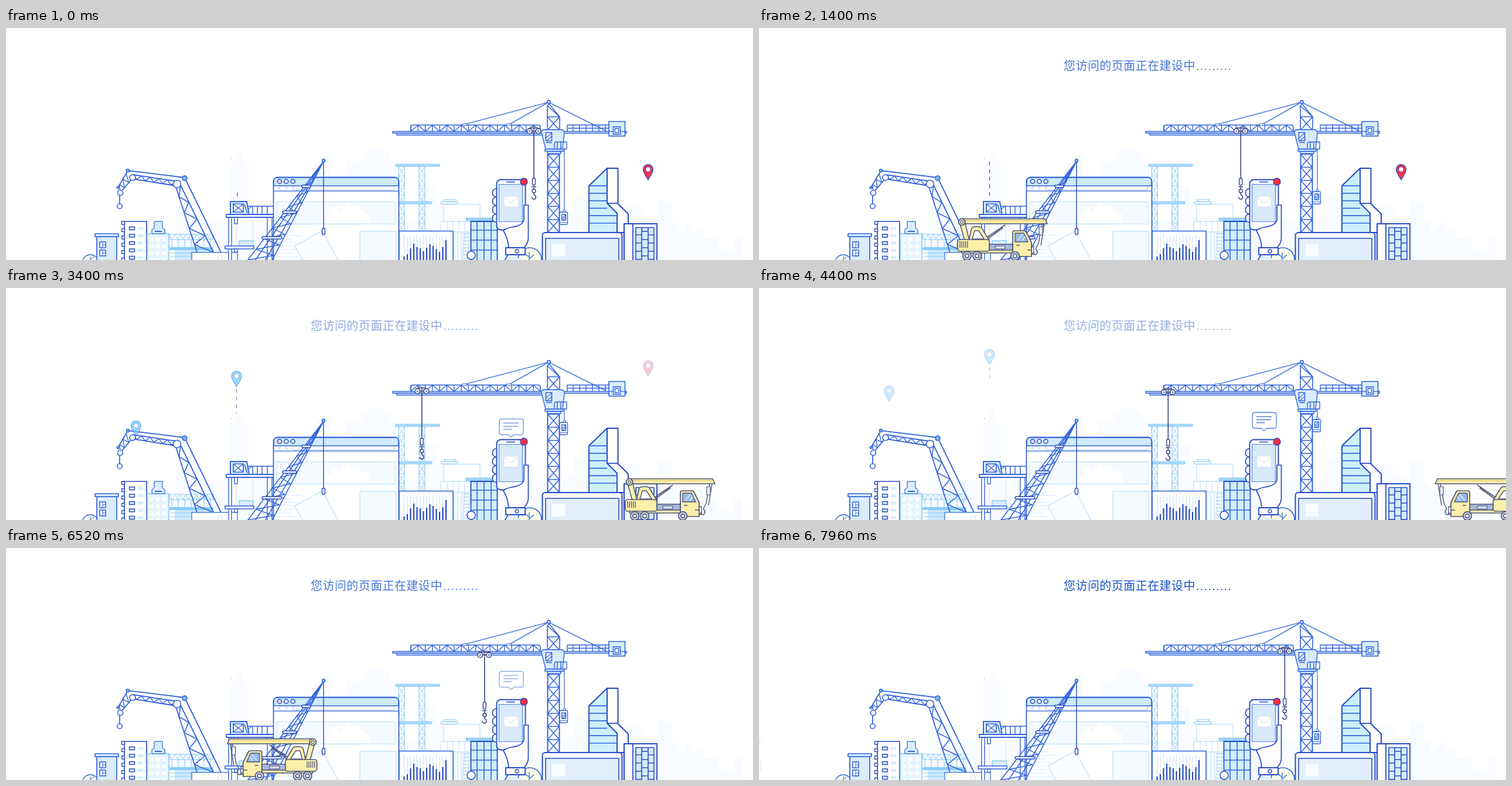
Animation, 1275 px wide and 397 px high, one loop 8000 ms. Source, as an HTML page:

```html
<!DOCTYPE html>
<html lang="zh-CN">
<head>
<meta charset="utf-8">
<style>
html, body { margin: 0; width: 100%; height: 100%; overflow: hidden; background: #fff; }
svg { display: block; width: 1275px; height: 397px; }
</style>
</head>
<body>
<svg id="stage" viewBox="0 0 1275 397" fill="none" stroke-linejoin="round"></svg>
<script>
const NAVY = '#2449c2', BLUE = '#3263d8', MID = '#4f80e2', SKY = '#8ccbf8', PALE = '#c4e5fb';
const ICE = '#d9edfd', MIST = '#f5faff', INK = '#4c5378', IRON = '#38447f', YELLOW = '#fcefa9';

// Shape helpers, all returning SVG markup
const paint = (s, w, f) => `stroke="${s}" stroke-width="${w}" fill="${f}"`;
const path = (d, s = BLUE, w = 1.6, f = 'none') => `<path d="${d}" ${paint(s, w, f)}/>`;
const line = (p, s, w, f) => path('M' + p, s, w, f);
const rect = (x, y, w, h, s = BLUE, sw = 1.6, f = 'none', r = 0) =>
  `<rect x="${x}" y="${y}" width="${w}" height="${h}" rx="${r}" ${paint(s, sw, f)}/>`;
const disc = (x, y, r, s = BLUE, w = 1.6, f = '#fff') => `<circle cx="${x}" cy="${y}" r="${r}" ${paint(s, w, f)}/>`;
const group = (id, body) => `<g id="${id}">${body}</g>`;
const times = (n, fn) => Array.from({ length: n }, (_, i) => fn(i)).join('');
const mix = (a, b, k) => a + (b - a) * k;

// Zigzag bracing between rail a and rail b, each [x1, y1, x2, y2]
function zig(a, b, n, s, w = 1.3) {
  let d = '';
  for (let i = 0; i <= n; i++) {
    const r = i % 2 ? b : a;
    d += `${mix(r[0], r[2], i / n).toFixed(1)} ${mix(r[1], r[3], i / n).toFixed(1)} `;
  }
  return line(d, s, w);
}
function mast(x1, x2, top, bottom, n, s, w) {
  const h = (bottom - top) / n;
  return path(`M${x1} ${top}V${bottom}M${x2} ${top}V${bottom}`, s, w) + times(n, i => {
    const y = top + i * h;
    return path(`M${x1} ${y}H${x2}L${x1} ${y + h}M${x1} ${y}L${x2} ${y + h}`, s, w * .75);
  });
}

const skyline = line('290 397V300H318V328H383V232L390 228L398 205L406 228L413 236V328H520V240L531 230L545 217H553V250H580V228H609V214H618V205H645V214H655V228H665V330H706V270H735V300H760V330H960V320H970V290H990V330H1055V305H1065V300H1080L1085 318L1100 325H1112V297H1136V332H1145V346H1160V332H1171V346H1190V360H1215V378H1229V384H1243V360H1256V397Z', 'none', 0, '#f8fbff')
  + rect(384, 223, 1.5, 1, 'none', 0, '#999');

function leftTown() {
  return disc(144, 402, 14, BLUE, 1.4, '#fbfdec') + path('M144 397V391M144 396L150 392', BLUE, 1)
    + rect(155, 357, 34, 44, BLUE, 1.7, ICE) + rect(152, 352, 40, 5, BLUE, 1.7, ICE)
    + times(2, i => rect(160, 366 + 14 * i, 10, 10, BLUE, 1.5, '#fff') + path(`M165 ${366 + 14 * i}v10M165 ${371 + 14 * i}h5`, BLUE, 1))
    + rect(202, 331, 38, 70, NAVY, 1.7, '#fff')
    + times(6, i => rect(197.5, 331 + 12.5 * i, 5, 5, NAVY, 1.4, '#fff'))
    + times(5, i => rect(210.5, 340.5 + 12.5 * i, 9, 5, NAVY, 1.4, ICE) + rect(225, 340.5 + 12.5 * i, 9, 5, 'none', 0, ICE))
    + rect(241, 352, 37, 49, SKY, 1.6, '#e6f4fe')
    + times(12, i => rect(245 + 11 * (i % 3), 358 + 12 * (i / 3 | 0), 6, 7, 'none', 0, '#fff'))
    + path('M249 352V345L253 342V331H267V342L271 345V352Z', MID, 1.5, ICE) + path('M254 348h12', BLUE, 2)
    + rect(279, 353, 74, 9, SKY, 1.2) + zig([279, 353, 353, 353], [279, 362, 353, 362], 16, SKY, 1)
    + times(7, i => path(`M${283 + 11 * i} 362v14`, SKY, 1.2))
    + rect(279, 375, 75, 5, 'none', 0, SKY) + rect(288, 380, 66, 20, 'none', 0, '#cce7fc')
    + path('M280 385h72M280 391h72', SKY, 1.2);
}

function leftCrane() {
  return path('M208 244L305 256L367 384M217 251L290 262M215 258L290 270M290 272L326 384M297 267L354 384M208 244L191 273M216 257L195 282M194 286V301', BLUE, 1.8)
    + zig([217, 251, 290, 262], [215, 258, 290, 270], 10, BLUE, 1.4)
    + zig([298, 270, 354, 384], [291, 275, 326, 384], 8, BLUE, 1.6)
    + zig([205, 249, 191, 273], [213, 260, 195, 282], 5, BLUE, 1.4)
    + disc(208, 244, 2.5, BLUE, 1.6, SKY) + disc(191, 273, 1.8, BLUE, 1.5, SKY) + disc(305, 257, 4, BLUE, 1.6, '#7fb2ef')
    + disc(292, 267, 6.5) + disc(216, 256, 5) + disc(195, 282, 4.5) + disc(194, 305, 4.2)
    + rect(317, 384, 78, 20, MID, 1.5, '#fff') + rect(362, 390, 7, 12, '#ccd8ee', 1);
}

function tower() {
  return rect(380, 324, 5, 76, BLUE, 1.4, '#fff') + rect(446, 324, 8, 76, BLUE, 1.4, '#fff')
    + path('M383 319V297H411L415 319', BLUE, 1.9, ICE) + rect(388, 301, 17, 14, BLUE, 1.7, '#fff')
    + path('M388 301L405 315M405 301L388 315M407 302L412 317', BLUE, 1.5)
    + path('M413 305H456M413 310L420 305M421 305V319M429 305V319M437 305V319M446 305V319', BLUE, 1.5)
    + rect(376, 319, 81, 5, BLUE, 1.8, '#fff') + rect(390, 324, 5, 11, BLUE, 1.4, '#fff')
    + path('M393 335V373M421 324V373', '#d5e6fb', 1) + rect(398, 364, 24, 9, SKY, 1.4, ICE)
    + rect(374, 373, 49, 5, BLUE, 1.6, '#fff') + rect(390, 378, 5, 6, BLUE, 1.3, '#fff');
}

function browser() {
  return rect(456.5, 255.5, 214, 160, BLUE, 1.8, '#fff', 7)
    + path('M457 270V262Q457 256 464 256H664Q670 256 670 262V270Z', BLUE, 1.6, '#cfeafd')
    + path('M457 279H670', MID, 1.4)
    + ['#ffdbe3', '#e2f0ff', '#e2f0ff'].map((f, i) => disc(467 + 11.3 * i, 262.5, 3.6, NAVY, 1.5, f)).join('')
    + path('M469 271L465 274L469 277M476 271L480 274L476 277', '#a9bfe8', 1)
    + rect(489, 271, 175, 6, '#a9bfe8', 1, '#fff', 3)
    + rect(461.5, 297.5, 203, 38, '#c9e8fc', 1.3, MIST)
    + path('M545 334V319H555V306H565V313H572V304H580V300H586V306H596V303H603V313H612V318H621V334Z', 'none', 0, '#fff')
    + times(8, i => path(`M461 ${349 + 6 * i}h${[32, 44, 28, 38][i % 4]}`, '#e0effc', 1.4))
    + path('M508 400L493 373L540 347L568 400', PALE, 1.5, '#fafdff')
    + rect(604, 348, 61, 60, PALE, 1.5, MIST);
}

function lattice() {
  const bar = (x, y, w) => rect(x, y, w, 4, NAVY, 1.5, '#fff', 2);
  return path('M542 228L412 398M541 230L453 400M541 230L425 398M540 232L442 398', BLUE, 1.6)
    + zig([538, 233, 413, 397], [538, 236, 452, 398], 18, BLUE, 1.4)
    + bar(505, 269, 15) + bar(472, 313, 24) + bar(437, 357, 34)
    + path('M542 230V343', NAVY, 1.4) + rect(539.5, 342.5, 5, 11, NAVY, 1.4, '#fff', 2.5)
    + disc(542, 227, 2.6, BLUE, 1.5, SKY);
}

function middle() {
  const tops = [391, 387, 377, 369, 375, 377, 382, 376, 370, 373, 378, 383, 375, 363];
  return mast(670, 680, 237, 350, 7, SKY, 1.2) + mast(705, 715, 237, 350, 7, SKY, 1.2)
    + rect(665, 233, 75, 4, SKY, 1, '#a9dafa') + rect(671, 297, 56, 4, SKY, 1, '#a9dafa')
    + rect(747, 301.5, 62, 30, PALE, 1.4, '#fff') + rect(743, 297, 28, 4, SKY, 1.2, '#fff') + rect(748, 293.5, 20, 3, SKY, 1.2, '#fff')
    + rect(742, 331, 74, 18, PALE, 1.4, '#fff') + times(6, i => path(`M${753 + 10 * i} 331v18`, PALE, 1.2))
    + path('M765 349V397M771 349V397M777 349V397M783 349L779 397M792 349L788 397', PALE, 1.2)
    + times(8, i => path(`M780 ${352 + 6 * i}h11`, SKY, 1))
    + rect(671, 347.5, 92, 60, BLUE, 1.6, '#fff')
    + tops.map((y, i) => {
      const x = 679.5 + 5.5 * i;
      return path(`M${x} ${354 + 3 * (i % 2)}V397`, '#d9e8f6', 1.6) + path(`M${x} ${y}V397`, NAVY, 2.2);
    }).join('')
    + rect(785, 325, 50, 5, SKY, 1, '#9ed2f8') + rect(793.5, 331, 45, 70, NAVY, 1.8, '#cfeefb')
    + path('M804 331V397M816 331V397M828 331V397M794 346H838M794 363H838M794 380H838', BLUE, 1.6)
    + disc(794, 389, 7, NAVY, 1.5) + path('M794 396V400', NAVY, 1.5);
}

function phone() {
  return path('M850 344L858 376H884Q891 369 891.500 360V303H884Z', 'none', 0, '#fffdfc')
    + times(4, i => rect(830.5, 275 + 14.5 * i, 13, 14, NAVY, 1.7, '#fff', 6))
    + rect(837.5, 259.5, 49, 86, NAVY, 1.9, '#fff', 7)
    + rect(841.5, 267.5, 40, 64, MID, 1.2, '#d7e9fb') + path('M854 263.500h15', NAVY, 1.6)
    + rect(850, 288, 24, 18, '#dce5f0', 1, '#fff') + path('M850 289L862 299L874 289', '#dce5f0', 1.2)
    + path('M858 376Q857 360 849 347Q852 343 862 341Q884 338 884 327V303H891.500V360Q891 369 884 376', NAVY, 1.7, '#fffdfc')
    + rect(853, 376, 33, 12, NAVY, 1.8, '#fff') + disc(872, 382, 3, NAVY, 1.3)
    + path('M857 388L851 398H888', NAVY, 1.6, '#e4f0fd')
    + disc(884, 263, 6, NAVY, 1.3, '#f82f45');
}

function towerCrane() {
  const cells = times(18, i => {
    const x = 691 + 12.3 * i;
    return path(`M${x} 177V166M${x} ${i % 2 ? 166 : 177}L${x + 12.3} ${i % 2 ? 177 : 166}`, BLUE, 1.4);
  });
  return path('M926 127L782 165M926 127L859 165M926 127L1024 176', MID, 1.7)
    + path('M691 177V170Q691 166 695 166H908Q912 166 912 170V177', BLUE, 1.7) + cells
    + path('M958 177V166H1029M958 171.500H1029' + times(6, i => `M${968 + 11 * i} 166v11`), BLUE, 1.4)
    + rect(778, 164, 9, 3, BLUE, 1.2, '#fff', 1.5) + rect(854, 164, 9, 3, BLUE, 1.2, '#fff', 1.5)
    + path('M924 175V133L927 130L945 152V175M924 152H945M924 133L945 152L924 175M924 152L945 175', BLUE, 1.6)
    + rect(660, 177, 399, 3, BLUE, 1.4, '#dcecff') + rect(667, 180, 251, 3.2, BLUE, 1.4, '#dcecff')
    + rect(1029, 160, 27.5, 25, BLUE, 1.6, ICE) + path('M1029 177H1059', BLUE, 1.2)
    + rect(1036.5, 169, 12, 13, BLUE, 1.5, ICE) + rect(1039.5, 172, 6, 7, BLUE, 1.3, '#fff')
    + mast(924.5, 944.5, 216, 350, 6, BLUE, 2)
    + rect(924, 211, 23, 4, BLUE, 1.5, ICE) + rect(920, 207.5, 31, 3.5, BLUE, 1.5, ICE)
    + path('M919 174H947Q953 174 953 181L950 207H921L914 179Q914 174 919 174Z', MID, 1.8, '#dbebfd')
    + rect(921.5, 179, 10, 14, BLUE, 1.7, '#fff') + path('M922 188L931 180M923 193L931 186M922 196h10', BLUE, 1.3)
    + path('M936 207V199Q936 195 940 195H957V207H951M941 195V207M947 195V207', BLUE, 1.4)
    + disc(926.5, 126.5, 2.6, BLUE, 1.6, '#dff0ff');
}

function rightTown() {
  return path('M1026 240H1044.500V301L1062 318V350H1026Z', NAVY, 2, '#fff')
    + path('M995 350V270L1026 240V300L1043 317V350Z', NAVY, 2, '#cdeffc')
    + times(6, i => path(`M995 ${270 + 12.8 * i}H${i < 4 ? 1026 : 1043}`, BLUE, 1.7))
    + path('M1026 300H1044', NAVY, 1.7)
    + rect(1055, 335, 56, 70, NAVY, 2, '#fff') + rect(1070, 335, 41, 70, NAVY, 1.8, '#fff')
    + rect(1075, 341.5, 31, 60, NAVY, 1.6, '#d4ecfc') + path('M1085 341V397M1096 341V397', NAVY, 1.6)
    + times(4, i => path(`M1075 ${354 + 14 * i}h10M1085 ${348 + 14 * i}h11M1096 ${354 + 14 * i}h10`, NAVY, 1.4))
    + rect(915.5, 350, 136, 60, NAVY, 2, '#f7fafe', 5) + rect(921, 360, 125, 50, NAVY, 1.6, '#e2effc')
    + rect(932, 369, 23, 22, 'none', 0, '#f8fbff')
    + disc(894, 396, 20, BLUE, 1.6, '#f9fbe9') + path('M893 397V384M893 395L901 388M893 392L886 387', BLUE, 1.3);
}

function truck() {
  const wheel = x => disc(x, 390, 7.3, INK, 1.6, '#c8cfe2') + disc(x, 390, 3.2, INK, 1.4, '#fff');
  return path('M47 361L82 337M52 361L78 342', INK, 1.7)
    + path('M5 335L13 364H21L14 335Z', INK, 1.5, YELLOW)
    + path('M145 335L139 368L134 378M149 335L143 372', INK, 1.4) + rect(140, 340, 6, 14, INK, 1.2, '#eef1fa')
    + path('M134 378Q140 384 134 388Q128 388 130 384', INK, 1.7)
    + path('M20 364L24 345Q25 340 31 340H37Q41 340 43 344L54 362V366Z', INK, 1.6, YELLOW)
    + path('M26 361L30 347H37L46 361Z', INK, 1.4, '#fff')
    + rect(8, 374, 92, 11, INK, 1.5, YELLOW) + rect(1, 362, 54, 20, INK, 1.6, YELLOW, 4)
    + times(5, i => path(`M${5 + 3.2 * i} 365v11`, INK, 1.3))
    + rect(55, 370, 40, 10, INK, 1.4, '#a9b9dc') + rect(65, 373, 17, 5, INK, 1.1, '#d6e0f1')
    + path('M95 391V350Q95 347 98 347H115Q117 347 118 349L127 367V391Z', INK, 1.7, YELLOW)
    + path('M99 351H114L121 366H99Z', INK, 1.4, '#97bbe8') + path('M104 363L112 353M111 364L116 357', '#e4f0ff', 1.5)
    + path('M101 372h6M120 380h7M126 374h5v13h-5', INK, 1.3)
    + path('M8 326.500H150L154 335H9Z', INK, 1.6, YELLOW) + path('M14 329.500H149', '#d8c372', 1)
    + disc(8, 332, 5.6, INK, 1.8, YELLOW) + disc(8, 332, 2.4, INK, 1.2, '#fff')
    + wheel(17) + wheel(34) + wheel(99);
}

const pin = (fill, s) => path('M0 0C-3-6-8.500-12-8.500-18A8.500 8.500 0 1 1 8.500-18C8.500-12 3-6 0 0Z', s, 1.3, fill) + disc(0, -18, 4.2, s, 1.1);

const trolley = path('M901 180V257', IRON, 1.6)
  + rect(895, 170, 12, 6, IRON, 1.2, '#e7effb') + path('M891 172H911M901 170V180', IRON, 1.2)
  + [893.5, 908.5].map(x => disc(x, 176.5, 4.2, IRON, 1.5) + disc(x, 176.5, 1.2, IRON, 1)).join('')
  + rect(898.5, 257, 5, 12, IRON, 1.4, '#fff', 2.5) + path('M897 271.500H905M901 272V276', IRON, 1.5)
  + disc(901, 279, 3, IRON, 1.5) + path('M901 282V285Q906 288 903.500 292Q899 295 897 289.500', IRON, 1.6);

const lift = disc(953, 2, 2, BLUE, 1.1) + rect(945, 4, 13.5, 21, BLUE, 1.3, '#fff', 2) + rect(948.5, 8, 7, 10, BLUE, 1.4, '#e3efff')
  + path('M949 15L955 9M950 18L956 12M946 21.500H958', BLUE, 1.2);

const bubble = path('M846 0H879Q883 0 883 4V23Q883 27 879 27H867L862 31L857 27H846Q842 27 842 23V4Q842 0 846 0Z', MID, 1.3, '#fff')
  + path('M849 7H875M849 12.500H874M849 17.500H863', MID, 1.3);

const caption = `<text x="520" y="72" fill="#1450c8" font-size="20" font-weight="300" letter-spacing=".45" font-family="'Noto Sans CJK SC','Noto Sans CJK',sans-serif">您访问的页面正在建设中</text>`
  + `<text x="746" y="72" fill="#1450c8" font-size="20" letter-spacing="1.24" font-family="'Liberation Sans',sans-serif">.........</text>`;

document.getElementById('stage').innerHTML = skyline + leftTown() + leftCrane() + tower() + middle() + browser() + lattice()
  + towerCrane() + group('rope', path('M953 207V212', BLUE, 1.2)) + group('lift', lift)
  + rightTown() + group('trolley', trolley) + group('bubble', bubble) + phone()
  + group('red', pin('#f8304a', '#3357bd')) + group('left', pin('#6cc8fa', MID))
  + group('dash', '<path stroke="#35488f" stroke-width="1.2" stroke-dasharray="6 7"/>') + group('mid', pin('#6cc8fa', MID))
  + group('truck', truck()) + group('caption', caption);

const ids = ['rope', 'lift', 'trolley', 'bubble', 'red', 'left', 'dash', 'mid', 'truck', 'caption'];
const parts = Object.fromEntries(ids.map(id => [id, document.getElementById(id)]));

// Piecewise linear track: time, value, time, value...
function track(t, ...k) {
  if (t <= k[0]) return k[1];
  for (let i = 2; i < k.length; i += 2)
    if (t < k[i]) return mix(k[i - 1], k[i + 1], (t - k[i - 2]) / (k[i] - k[i - 2]));
  return k[k.length - 1];
}
function place(id, x, y, opacity = 1, extra = '') {
  parts[id].setAttribute('transform', `translate(${x.toFixed(2)} ${y.toFixed(2)})${extra}`);
  parts[id].setAttribute('opacity', opacity.toFixed(3));
}

function draw(t) {
  place('caption', 0, 0, t < 40 ? 0 : track(t, 0, 1, 4000, .4, 8000, 1));

  const fade = track(t, 0, 0, 400, 1, 7600, 1, 8000, 0);
  if (t < 4000) place('truck', -164.5 + .359 * t, 0, fade);
  else place('truck', 1454.5 - .3662 * (t - 4000), 0, fade, ' scale(-1 1)');

  place('trolley', track(t, 0, 0, 4000, -225, 8000, -1.5), track(t, 4000, 0, 6000, 9, 8000, 0));
  const y = track(t, 0, 311, 4000, 211, 8000, 311);
  place('lift', 0, y);
  parts.rope.firstChild.setAttribute('d', `M953 207V${y.toFixed(2)}`);

  place('bubble', 0, track(t, 2000, 250, 4000, 213, 6000, 213, 8000, 206), track(t, 2000, 0, 3600, 1, 6000, 1, 7900, 0));
  place('red', 1096, track(t, 1720, 260, 4000, 112), track(t, 1720, 1, 4000, 0));
  const dim = track(t, 2520, 1, 4400, .35, 5000, 0);
  place('left', 222, track(t, 1720, 354, 5000, 158), Math.min(dim, track(t, 1720, 0, 2400, 1)));

  const top = track(t, 0, 282, 1400, 229, 1900, 229, 2520, 206, 4400, 136, 5000, 114);
  const end = track(t, 2144, 288, 2520, 266, 4400, 156, 4800, 121);
  parts.dash.firstChild.setAttribute('d', `M${track(t, 0, 395, 1400, 393.5)} ${top.toFixed(2)}V${Math.max(top, end).toFixed(2)}`);
  parts.dash.setAttribute('opacity', dim.toFixed(3));
  place('mid', 393.5, top - 4.5, Math.min(dim, track(t, 1500, 0, 1900, 1)));
}

let start;
function frame(now) {
  if (start === undefined) start = now;
  draw((now - start) % 8000);
  requestAnimationFrame(frame);
}
draw(0);
requestAnimationFrame(frame);
</script>
</body>
</html>
```
